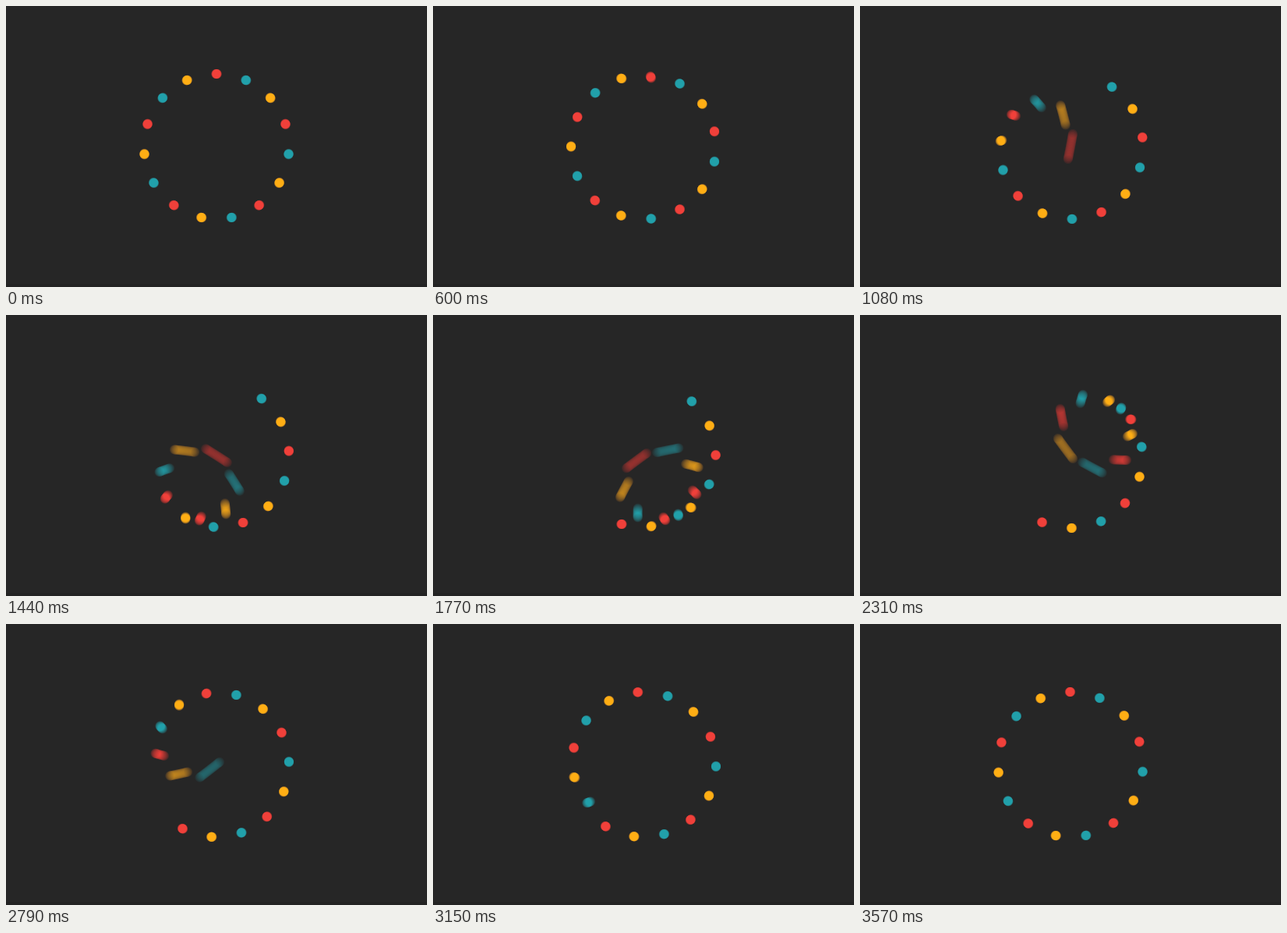
These frames come from a looping animation (540x360 px, 3.6 s). An HTML page with a canvas:

```html
<!DOCTYPE html>
<html lang="en">
<head>
<meta charset="utf-8">
<title>Ring of dots</title>
<style>
  html, body { margin: 0; width: 100%; height: 100%; overflow: hidden; background: #262626; }
  canvas { display: block; width: 540px; height: 360px; }
</style>
</head>
<body>
<canvas id="stage" width="540" height="360"></canvas>
<script>
const W = 540, H = 360, CX = 270, CY = 180;
const LOOP = 3600, STEP = 30;
const COUNT = 15, RING = 93, DOT = 6;
const FIRST = 1080, STAGGER = 120, RATE = 0.0041;
const SHUTTER = 90, SAMPLES = 24;
const COLORS = [[240, 64, 58], [33, 160, 170], [255, 174, 20]];

const ctx = document.getElementById('stage').getContext('2d');

// Each dot crosses the slowly turning ring along its own diameter.
function place(i, t) {
  const angle = (i * 360 / COUNT + t / 100) * Math.PI / 180;
  const cross = FIRST + STAGGER * ((COUNT - i) % COUNT);
  const r = RING * Math.tanh((cross - t) * RATE);
  return [CX + r * Math.sin(angle), CY - r * Math.cos(angle)];
}

function coverage(path, x, y) {
  let sum = 0;
  for (const [px, py] of path) {
    const d = DOT + 0.5 - Math.hypot(x - px, y - py);
    sum += Math.max(0, Math.min(1, d));
  }
  return sum / path.length;
}

// Blend in squared (roughly linear) light so streaks stay bright.
function mix(from, to, a) {
  return Math.sqrt(from * from * (1 - a) + to * to * a);
}

function drawDot(img, i, t) {
  const path = Array.from({ length: SAMPLES }, (_, k) =>
    place(i, t + SHUTTER * ((k + 0.5) / SAMPLES - 0.5)));
  const xs = path.map(p => p[0]), ys = path.map(p => p[1]);
  const pad = DOT + 1, color = COLORS[i % 3];
  const x0 = Math.floor(Math.min(...xs) - pad), x1 = Math.ceil(Math.max(...xs) + pad);
  const y0 = Math.floor(Math.min(...ys) - pad), y1 = Math.ceil(Math.max(...ys) + pad);
  for (let y = y0; y < y1; y++) {
    for (let x = x0; x < x1; x++) {
      const a = coverage(path, x + 0.5, y + 0.5);
      if (!a) continue;
      const at = (y * W + x) * 4;
      for (let c = 0; c < 3; c++) img.data[at + c] = mix(img.data[at + c], color[c], a);
    }
  }
}

ctx.fillStyle = '#262626';
ctx.fillRect(0, 0, W, H);
ctx.fillStyle = '#232323';
ctx.fillRect(0, H - 4, W, 4);
const base = ctx.getImageData(0, 0, W, H);

function draw(t) {
  const img = new ImageData(new Uint8ClampedArray(base.data), W, H);
  for (let i = 0; i < COUNT; i++) drawDot(img, i, t);
  ctx.putImageData(img, 0, 0);
}

const start = performance.now();
let shown = -1;
function tick() {
  const t = Math.floor((performance.now() - start) % LOOP / STEP) * STEP;
  if (t !== shown) draw(shown = t);
  requestAnimationFrame(tick);
}
tick();
</script>
</body>
</html>
```
